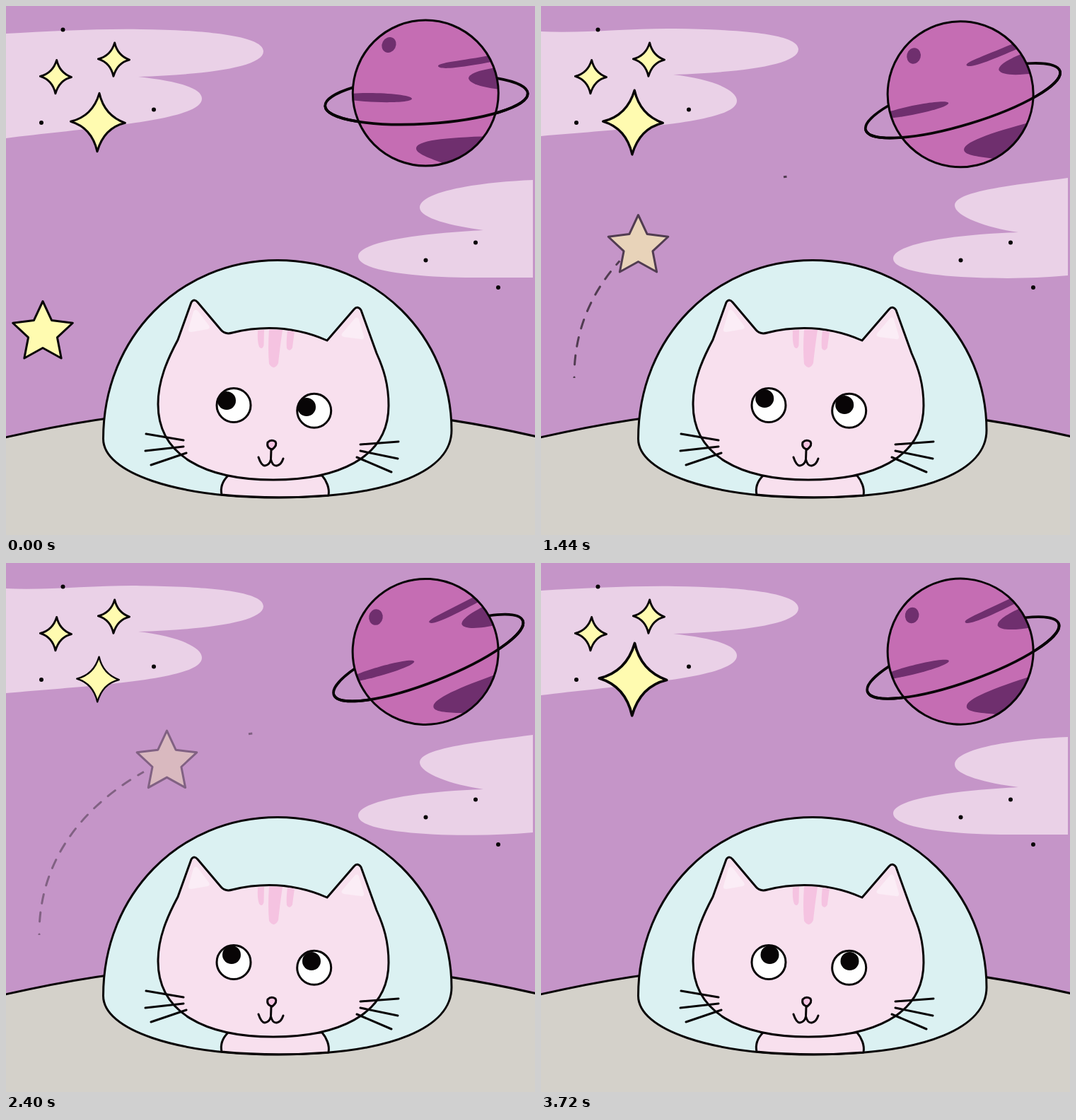
These frames come from a looping animation (748x748 px, 3750 ms). An HTML page:

```html
<!DOCTYPE html>
<html lang="en">
<head>
<meta charset="utf-8">
<title>Space cat</title>
<style>
html, body { margin: 0; width: 100%; height: 100%; overflow: hidden; background: #c595c8; }
svg { display: block; width: 100vw; height: 100vh; }
.line { fill: none; }
.ink { stroke: #080506; stroke-width: 3; stroke-linecap: round; stroke-linejoin: round; }
.ring { stroke-width: 3.7; }
.small { stroke-width: 5; }
.dot { fill: #080506; }
.cloud { fill: #ead1e7; }
.glow { fill: #fffbb0; }
.spot { fill: #6f2f6e; }
.fur { fill: #f8e0ee; }
.stripe { fill: #f5c3e1; }
.ear { fill: #fbedf6; }
</style>
</head>
<body>
<svg viewBox="0 0 748 748">
  <defs>
    <path id="sparkle" d="M2-41Q9-9.500 38.500 1Q8.500 8-1 41.500Q-8.500 8-38.500-1Q-7.500-8.500 2-41Z"/>
    <clipPath id="disk"><circle cx="593.3" cy="123" r="103"/></clipPath>
    <mask id="reveal" maskUnits="userSpaceOnUse" x="0" y="200" width="400" height="360">
      <path id="wipe" d="M47 526C46 385 160 280 345 241" fill="none" stroke="#fff" stroke-width="14"/>
    </mask>
  </defs>
  <rect width="748" height="748" fill="#c595c8"/>
  <path id="cloudL" class="cloud"/>
  <path id="cloudR" class="cloud"/>

  <g class="dot">
    <circle cx="80.5" cy="33.5" r="3"/><circle cx="50" cy="165" r="3"/>
    <circle cx="209" cy="146.5" r="3"/><circle cx="593.5" cy="359.5" r="3"/>
    <circle cx="664" cy="334.5" r="3"/><circle cx="696" cy="398" r="3"/>
  </g>

  <g class="glow ink">
    <use href="#sparkle" class="small" transform="translate(70.5 100) scale(.575)"/>
    <use href="#sparkle" class="small" transform="translate(152.5 75.5) scale(.575)"/>
    <use href="#sparkle" id="big"/>
  </g>

  <g id="planet">
    <ellipse class="line ink ring" cx="594.5" cy="132.5" rx="143.5" ry="34" transform="rotate(-3.6 594.5 132.5)"/>
    <circle cx="593.3" cy="123" r="103" fill="#c56db3"/>
    <g class="spot" clip-path="url(#disk)">
      <ellipse cx="541.5" cy="55" rx="9.8" ry="11.3" transform="rotate(28 541.5 55)"/>
      <path d="M611 85C611 80 640 78 690 69L692 78C655 85 613 92 611 85Z"/>
      <path d="M654 102C655 95 672 90 694 87L700 118C680 116 655 111 654 102Z"/>
      <path d="M488 124C520 121 573 125 574 131C574 138 515 137 488 133Z"/>
      <path d="M580 202C579 190 620 186 685 184L660 222L622 224C605 217 581 210 580 202Z"/>
    </g>
    <circle class="line ink" cx="593.3" cy="123" r="103"/>
    <path class="line ink ring" d="M451 132.5A143.5 34 0 0 0 738 132.5" transform="rotate(-3.6 594.5 132.5)"/>
  </g>

  <path class="ink" d="M-5 611Q374 522 753 609.5V760H-5Z" fill="#d4d1ca"/>
  <path class="ink" d="M137.500 612C137.500 469 245 359.500 384 359.500C523 359.500 630 467 630 600C630 655 550 695 384 695C240 695 137.500 660 137.500 612Z" fill="#dbf1f2"/>

  <path class="fur ink" d="M314 664C306 672 303 682 305 691Q380 698 456 692C458 682 453 671 447 664Z"/>
  <path class="fur ink" d="M243 472L262 419Q266 413 271 419L304 458Q310 465 320 462Q390 445 454 473L492 429Q497 423 502 430L524 491C534 513 541 535 541 565C541 642 464 670 378 670C282 670 215 636 215 563C215 530 228 500 243 472Z"/>
  <path class="ear" d="M265 432Q268 427 272 432L287 452Q289 456 285 457L262 461Q257 461 258 457Z"/>
  <path class="ear" d="M493 442Q497 438 499 443L506 467Q507 472 502 471L478 468Q472 466 476 462Z"/>
  <g class="stripe">
    <path d="M356 459L365 458L364.5 480Q362 487 358 482Q355 474 356 459Z"/>
    <path d="M372 457.5L391 458Q387 485 385 505Q379 517 372 506Q370 485 372 457.5Z"/>
    <path d="M398 459L408 460.5Q406 474 405 483Q401 490 397 484Q396 474 398 459Z"/>
  </g>

  <g class="ink">
    <circle cx="322" cy="564.5" r="24" fill="#fff"/>
    <circle cx="435.7" cy="572.3" r="24" fill="#fff"/>
    <path class="stripe" d="M370 617Q375 612 381 616Q384 621 376.5 627Q368 625 370 617Z"/>
    <path class="line" d="M375 627L374.5 641M357 638Q361 650 366 650Q373 649 374.5 641Q377 651 383 650Q389 649 392 640"/>
    <path class="line" d="M198 605L251 614M197 629L251 623M205 649L255 632M501 620L555 616M501 629L554 640M496 638L545 659"/>
  </g>
  <g id="pupils" class="dot"><circle r="13"/><circle cx="113" cy="9" r="13"/></g>

  <g id="flight">
    <g class="line" stroke="#080506" stroke-width="3">
      <path id="trail" mask="url(#reveal)" stroke-linecap="round" d="M47 526C46 385 160 280 345 241"/>
      <path id="tail"/>
    </g>
    <path id="star" class="glow ink"/>
  </g>
</svg>
<script>
const LOOP = 3750, STEP = 30;
const TIMES = [0, 480, 990, 1440, 2070, 2730, 3720];
const $ = id => document.getElementById(id);
const set = (id, name, value) => $(id).setAttribute(name, value);

// Smooth curve through one value per entry of TIMES.
function curve(...v) {
  const last = v.length - 1;
  const slope = i => {
    const a = Math.max(i - 1, 0), b = Math.min(i + 1, last);
    return (v[b] - v[a]) / (TIMES[b] - TIMES[a]);
  };
  return t => {
    let i = 0;
    while (i < last - 1 && t > TIMES[i + 1]) i++;
    const h = TIMES[i + 1] - TIMES[i], u = (t - TIMES[i]) / h, w = 1 - u;
    return w * w * ((1 + 2 * u) * v[i] + u * h * slope(i))
         + u * u * ((3 - 2 * u) * v[i + 1] - w * h * slope(i + 1));
  };
}

const starX = curve(52, 62, 97, 137.5, 195.5, 260, 358);
const starY = curve(462, 414, 370, 340, 300, 265, 222);
const trailLength = curve(0, 74, 126, 182, 252, 326, 449);
const tailLength = curve(0, 2.5, 3.5, 4.5, 5, 5.5, 6);
const spin = curve(0, 7.6, -0.8, -13.3, -18.6, -16.5, -16);
const sparkle = curve(1, 1.215, 1.25, 1.1, 0.76, 0.865, 1.24);
const pupilX = curve(312, 313.5, 315, 316.2, 318, 320, 323.5);
const pupilY = curve(558, 557, 556, 555, 554, 554, 554);

function starPath() {
  const points = [];
  for (let i = 0; i < 10; i++) {
    const r = i % 2 ? 21.5 : 44.5, a = i * Math.PI / 5;
    points.push((r * Math.sin(a)).toFixed(2) + ' ' + (-r * Math.cos(a)).toFixed(2));
  }
  return 'M' + points.join('L') + 'Z';
}

const leftCloud = d =>
  `M0 ${39 - d}C60 ${36 + d} 130 ${32 - d * .3} 190 ${33 - d * .3}` +
  `C280 ${34 - d * .3} 364 ${42 - d} 364 ${64 - d}C364 ${87 - d} 280 ${97 - d} 187 ${100 - d}` +
  `C240 ${106 - d} 277 ${115 + d} 277 ${131 + d}C277 ${162 + d} 130 ${171 + d * .6} 0 ${187 - d}Z`;

const rightCloud = d =>
  `M745 ${246 - d}C670 ${249 + d * 1.5} 585 ${262 - d * .3} 585 ${285 - d}` +
  `C585 ${300 - d} 630 ${311 + d} 675 ${317 + d}C580 ${322 + d * .3} 498 ${334 + d} 498 ${354 + d}` +
  `C498 ${376 + d} 590 ${384 + d * .3} 660 ${384 + d * .3}Q700 ${384 + d * .3} 745 ${384 - d}Z`;

function draw(t) {
  const drift = 1.5 * (1 - Math.cos(8 * Math.PI * t / LOOP));
  const tail = tailLength(t);
  set('cloudL', 'd', leftCloud(drift));
  set('cloudR', 'd', rightCloud(drift));
  set('planet', 'transform', `rotate(${spin(t)} 600.8 124.7)`);
  set('big', 'transform', `translate(130 164.3) scale(${sparkle(t)})`);
  set('pupils', 'transform', `translate(${pupilX(t)} ${pupilY(t)})`);
  set('flight', 'opacity', Math.max(0, 1 - t / 3720));
  set('star', 'transform', `translate(${starX(t)} ${starY(t)})`);
  set('wipe', 'stroke-dasharray', `${trailLength(t)} 999`);
  set('tail', 'd', `M343 241.7l${tail} ${-tail / 8}`);
}

set('star', 'd', starPath());
set('trail', 'stroke-dasharray', '1 18 ' + '13 13 '.repeat(17));

const start = performance.now();
function frame() {
  const t = (performance.now() - start) % LOOP;
  draw(Math.floor(t / STEP) * STEP);
  requestAnimationFrame(frame);
}
frame();
</script>
</body>
</html>
```
